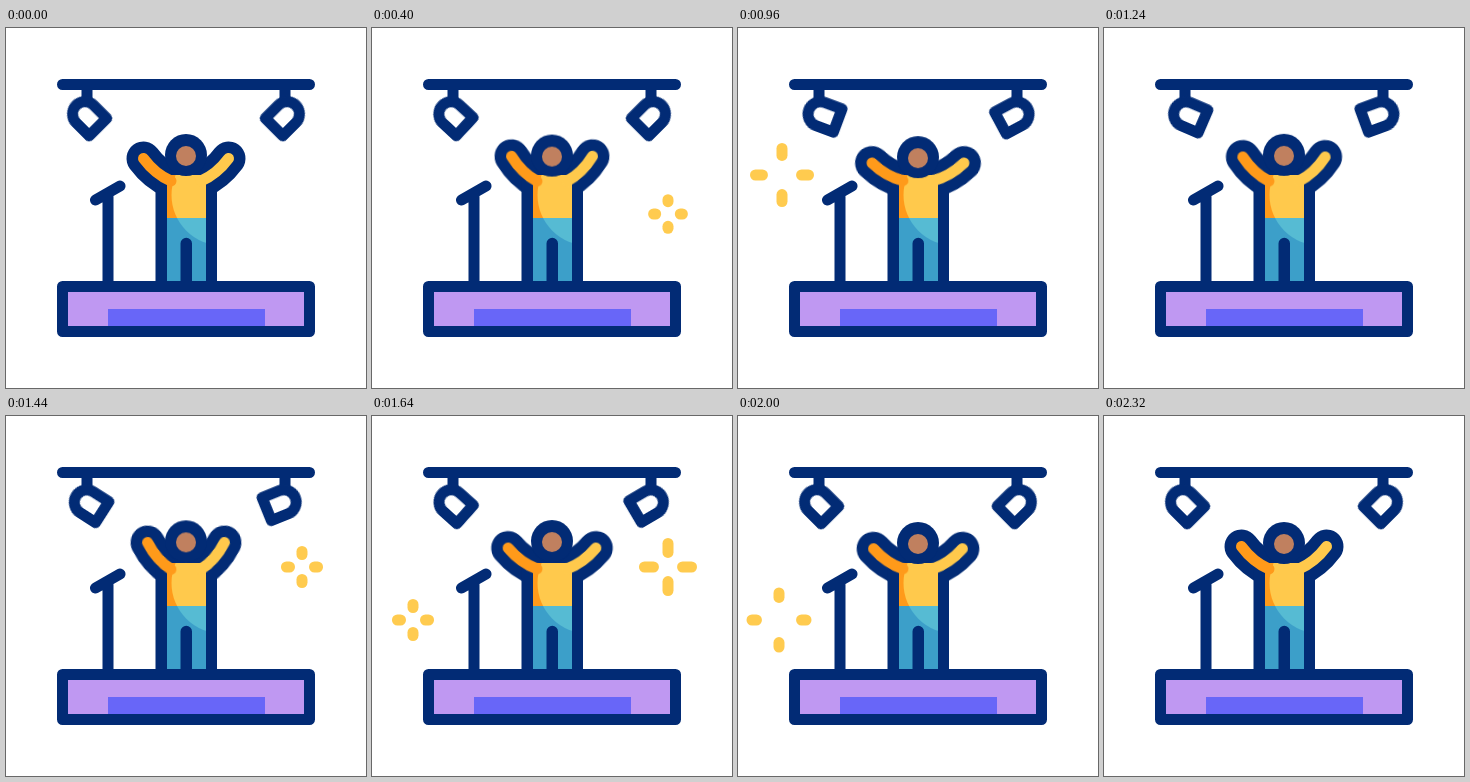
An HTML page that plays this animation: 360 px wide and 360 px high, repeating every 2.44 s.

```html
<!DOCTYPE html>
<html lang="en">
<head>
<meta charset="utf-8">
<title>On stage</title>
<style>
  html, body { margin: 0; height: 100%; overflow: hidden; background: #fff; }
  svg { display: block; width: 100vw; height: 100vh; }

  .line { fill: none; stroke: #022b75; stroke-width: 11; stroke-linecap: round; stroke-linejoin: round; }
  .navy { fill: #022b75; }
  .limb { fill: none; stroke-width: 11; stroke-linecap: round; }
  .limb.wide { stroke: #022b75; stroke-width: 34; }
  .orange { stroke: #ff9a1a; }
  .yellow { stroke: #ffc94c; }

  .lamp, .arm, .head, .spark, .spark use { animation: 2440ms ease-in-out infinite; }
  .lamp { transform: rotate(45deg); animation-name: swing; }
  .late { animation-delay: 240ms; }
  .arm { transform-origin: 163px 153px; animation-name: wave; }
  .head { animation-name: bob; }

  .spark { opacity: 0; animation-name: show; animation-timing-function: step-end; animation-delay: var(--at); }
  .spark use {
    fill: none; stroke: #ffcb4f; stroke-width: 11; stroke-linecap: round;
    animation-name: burst; animation-timing-function: linear; animation-delay: var(--at);
  }

  @keyframes swing {
    0%, 9.84%, 75.41%, 100% { transform: rotate(45deg); }
    42.62% { transform: rotate(20deg); }
  }
  @keyframes wave {
    0%, 8.2%, 90.16%, 100% { transform: rotate(0deg); }
    24.59%, 57.38% { transform: rotate(10deg); }
    40.98%, 73.77% { transform: rotate(-10deg); }
  }
  @keyframes bob {
    0%, 8.2%, 81.97%, 100% { transform: translateY(0); }
    32.79% { transform: translateY(2.5px); }
    65.57% { transform: translateY(-2px); }
  }
  @keyframes show {
    0% { opacity: 1; }
    22.95%, 100% { opacity: 0; }
  }
  /* each ray grows outward, then its tail catches up */
  @keyframes burst {
    0% { stroke-dasharray: 0 60; stroke-dashoffset: 0; }
    4.92% { stroke-dasharray: 3 60; stroke-dashoffset: -.5; }
    9.84% { stroke-dasharray: 7 60; stroke-dashoffset: -1.5; }
    13.11% { stroke-dasharray: 9 60; stroke-dashoffset: -2.5; }
    18.03% { stroke-dasharray: 7 60; stroke-dashoffset: -7.5; }
    19.67% { stroke-dasharray: 4.5 60; stroke-dashoffset: -10.5; }
    22.95%, 100% { stroke-dasharray: 0 60; stroke-dashoffset: -15.5; }
  }
</style>
</head>
<body>
<svg viewBox="0 0 360 360">
  <defs>
    <path id="lampBody" d="M22.6 -5.3H4.2A12.4 12.4 0 0 0 4.2 19.5H22.6Z"/>
    <path id="armPath" d="M137.5 130.5Q149 146 165 153"/>
    <path id="ray" d="M12 0H27.6"/>
    <path id="legs" d="M161 190H200V253H186V215.5A5.75 5.75 0 0 0 174.5 215.5V253H161Z"/>
    <clipPath id="glow"><circle cx="216" cy="167" r="50.5"/></clipPath>
  </defs>

  <!-- lights -->
  <path class="line" d="M56.5 56.5H303.5M81 57V73M279 57V73"/>
  <g transform="translate(81 78)">
    <g class="lamp"><use href="#lampBody" class="line" style="fill:#fff"/></g>
  </g>
  <g transform="translate(279 78) scale(-1 1)">
    <g class="lamp late"><use href="#lampBody" class="line" style="fill:#fff"/></g>
  </g>

  <!-- performer -->
  <g class="arm"><use href="#armPath" class="limb wide"/></g>
  <g transform="translate(360 0) scale(-1 1)">
    <g class="arm"><use href="#armPath" class="limb wide"/></g>
  </g>
  <path class="navy" d="M149.5 152H211V256H149.5Z"/>
  <path fill="#ff9a1a" d="M161 147H200V190H161Z"/>
  <use href="#legs" fill="#3c9fc9"/>
  <g clip-path="url(#glow)">
    <path fill="#ffc94c" d="M161 147H200V190H161Z"/>
    <use href="#legs" fill="#56bbd3"/>
  </g>
  <g class="arm"><use href="#armPath" class="limb orange"/></g>
  <g transform="translate(360 0) scale(-1 1)">
    <g class="arm"><use href="#armPath" class="limb yellow"/></g>
  </g>
  <g class="head">
    <circle class="navy" cx="180" cy="127" r="21"/>
    <circle cx="180" cy="128" r="10" fill="#c0805f"/>
  </g>

  <!-- microphone and stage -->
  <path class="line" d="M89.5 172L114 158M102 168V257"/>
  <path fill="#bf98f2" d="M57 259H303V303H57Z"/>
  <path fill="#6866f8" d="M102 281H259V300H102Z"/>
  <path class="line" d="M56.5 258.5H303.5V303.5H56.5Z"/>

  <g id="sparks"></g>
</svg>
<script>
  // x, y and start time in ms of each sparkle
  const sparks = [[296, 186, 320], [44, 147, 520], [296, 151, 1320], [41, 204, 1520]];
  const rays = [0, 90, 180, 270].map(a => `<use href="#ray" transform="rotate(${a})"/>`).join('');
  document.getElementById('sparks').innerHTML = sparks.map(([x, y, at]) =>
    `<g transform="translate(${x} ${y})"><g class="spark" style="--at:${at}ms">${rays}</g></g>`).join('');
</script>
</body>
</html>
```
